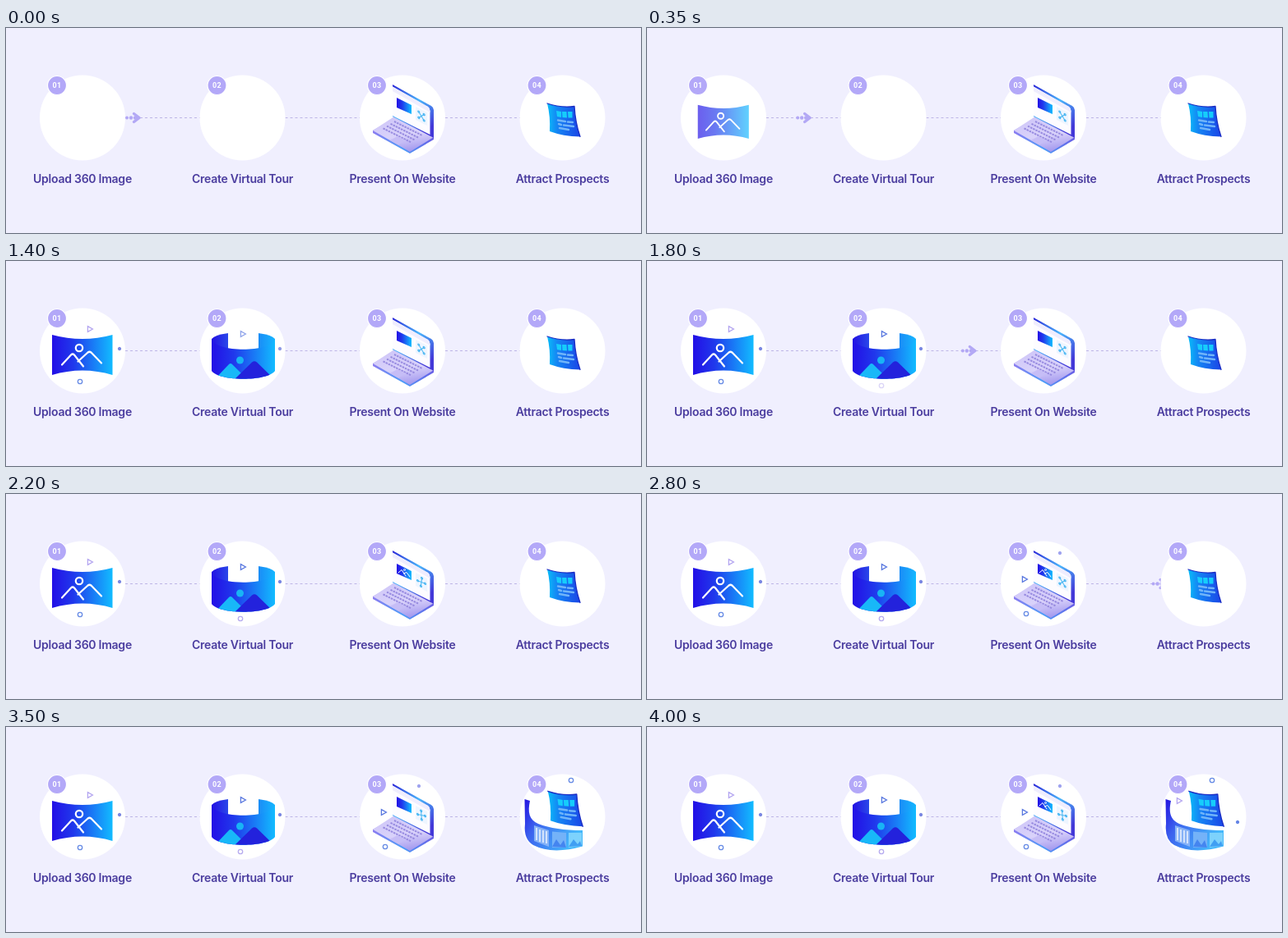
Animation, 772 px wide and 250 px high, one loop 4050 ms. Source, as an HTML page:

```html
<!DOCTYPE html>
<html lang="en">
<head>
<meta charset="utf-8">
<title>Four steps</title>
<style>
html, body { margin: 0; width: 100%; height: 100%; overflow: hidden; background: #f0effe; }
svg { display: block; }
.label { font: 600 14px Poppins, Inter, sans-serif; letter-spacing: -.25px; fill: #4b3d9f; text-anchor: middle; }
.num { font: 700 9px Roboto, sans-serif; letter-spacing: .3px; fill: #fff; text-anchor: middle; }
.line { fill: none; stroke-linecap: round; stroke-linejoin: round; }
</style>
</head>
<body>
<svg width="772" height="250" viewBox="0 0 772 250">
  <defs>
    <linearGradient id="blue"><stop stop-color="#230fe6"/><stop offset=".35" stop-color="#2038ec"/><stop offset="1" stop-color="#12bcff"/></linearGradient>
    <linearGradient id="back"><stop stop-color="#2410e2"/><stop offset="1" stop-color="#2a48ea"/></linearGradient>
    <linearGradient id="backRight"><stop stop-color="#1a8cf6"/><stop offset="1" stop-color="#16b6ff"/></linearGradient>
    <linearGradient id="sheet"><stop stop-color="#08bdf8"/><stop offset=".3" stop-color="#1585f4"/><stop offset="1" stop-color="#1a45e6"/></linearGradient>
    <linearGradient id="base" x1=".3" y1="0" x2=".6" y2="1"><stop stop-color="#cfc6f8"/><stop offset=".55" stop-color="#d9d2fa"/><stop offset="1" stop-color="#a297ee"/></linearGradient>
    <linearGradient id="rim"><stop stop-color="#8b7cf0"/><stop offset=".5" stop-color="#4c9cf8"/><stop offset="1" stop-color="#6a5ee6"/></linearGradient>
    <linearGradient id="frame" x2=".6" y2="1"><stop stop-color="#2a25d8"/><stop offset=".5" stop-color="#4ab4fa"/><stop offset="1" stop-color="#4338d8"/></linearGradient>
    <linearGradient id="strip" x2="1" y2=".5"><stop stop-color="#2414e0"/><stop offset=".35" stop-color="#3c62ee"/><stop offset="1" stop-color="#45b8fb"/></linearGradient>
    <clipPath id="band"><path d="M250 95C254 112 323 112 327 95V134C318 147 259 147 250 134Z"/></clipPath>
  </defs>

  <g id="lines" stroke="#bdb5e6" stroke-dasharray="3 3"></g>
  <g id="arrow" fill="#b3a8f5">
    <circle cx="1" cy="109.500" r="2"/><circle cx="6" cy="109.500" r="2.200"/><circle cx="11" cy="109.500" r="2.200"/>
    <path class="line" d="M9.500 104.500L16 109.500L9.500 114.500" stroke="#b3a8f5" stroke-width="3.400"/>
  </g>
  <g id="discs" fill="#fff"></g>

  <g id="photo">
    <path d="M56 90Q93 100 129.500 90V139Q93 128 56 139Z" fill="url(#blue)"/>
    <g class="line" stroke="#fff" stroke-width="2.200">
      <path d="M68 126.500L79 114.500Q81 112.500 83 114.500L94 128.500M87.500 122.500L99.500 111.500Q101.500 110 103.500 111.500L116 124.500"/>
      <circle cx="89" cy="106" r="4.200"/>
    </g>
  </g>

  <g id="tour">
    <path d="M250 95Q254 90 270 88V112L250 118Z" fill="url(#back)"/>
    <path d="M327 95Q323 90 307 88V112L327 118Z" fill="url(#backRight)"/>
    <path d="M250 95C254 112 323 112 327 95V134C318 147 259 147 250 134Z" fill="url(#blue)"/>
    <g clip-path="url(#band)">
      <path d="M252 146L271 126Q273 124 275 126L295 146Z" fill="#18b8f8"/>
      <path d="M276 146L299 123.500Q302 121 305 123.500L328 146Z" fill="#2322dc"/>
    </g>
    <circle cx="284.500" cy="121" r="4.500" fill="#18b4f5"/>
  </g>

  <g id="laptop">
    <path d="M446 125L472 110L520 133V136L491 153L446 128Z" fill="url(#rim)"/>
    <path d="M446 125L472 108L520 133L491 151Z" fill="url(#base)"/>
    <g id="keys" stroke="#978be0" stroke-width="2" stroke-dasharray="2.500 1"></g>
    <path d="M467 137L476 132L486 137L477 142.500Z" fill="#c6bdf6"/>
    <path d="M470 69L517 95Q520 97 520 100V134L470 108Z" fill="url(#frame)"/>
    <path d="M470 71.500L513 96Q515.500 98 515.500 101V130L470 107Z" fill="#fdfcff"/>
    <path d="M470 71.500L513 96Q515.500 98 515.500 101V103L470 77Z" fill="#efedfe"/>
    <path d="M475 85L493 94V105L475 97Z" fill="url(#blue)"/>
    <path d="M498 96L512 103V119L498 112Z" fill="#eef5ff"/>
    <g id="cross" class="line" stroke="#45b5f2" stroke-width="1.300">
      <path d="M-4 -5L4 5M4 -4L-4 4"/>
      <circle cx="-4" cy="-5" r="1.300"/><circle cx="4" cy="5" r="1.300"/><circle cx="4" cy="-4" r="1.300"/><circle cx="-4" cy="4" r="1.300"/>
    </g>
    <g id="thumb" class="line" stroke="#fff">
      <path d="M477 96L481 92.500L486 100M483.500 97L487 95.500L491 101"/><circle cx="484.500" cy="92.500" r="1"/>
    </g>
  </g>

  <g id="film">
    <path d="M630.500 88L637 90C634 104 636 113 647 118Q668 126 701 126V145.500Q664 156 641 144Q629 137 631 118Z" fill="url(#strip)"/>
    <path d="M642 120L660 126V146L642 139Z" fill="#86b2f7"/>
    <path d="M645 123V138M649 125V140M653 126V141M657 127V142" stroke="#fff" stroke-width="1.700" opacity=".75"/>
    <path d="M664 127.500L681 129V147L664 147Z" fill="#74b2f8"/>
    <path d="M664 146L669 137L674 144L678 138L681 147Z" fill="#4485f0"/>
    <path d="M684 129L700 129V145L684 147Z" fill="#7dd2fc"/>
    <path d="M684 146L690 137L695 143L698 139L700 145Z" fill="#3f9ff3"/>
  </g>
  <g id="panel">
    <path d="M658 92Q674 97.500 691 95.500Q692 115 698 132.500Q677 132 661 126Q662 108 658 92Z" fill="url(#sheet)"/>
    <path d="M658 92Q674 97.500 691 95.500Q692 115 698 132.500" class="line" stroke="#1a2cc4" stroke-width="1.300"/>
    <path d="M669 101L675 102V109L670 108ZM676 102H681.500L682 109.500L676.500 109ZM683 102H688.500V109.500H683.500Z" fill="#16cdfb"/>
    <path d="M671 112.500L680 114M683 114.500L689 115M672 117L675 118M678 118.500L690 120M673 122L684 124" class="line" stroke="#6fb4f9" stroke-width="2.400"/>
  </g>

  <g id="marks"></g>
  <g id="badges"></g>
</svg>
<script>
const LOOP = 4050, STEP = 50;
const $ = id => document.getElementById(id);
const add = (id, markup) => $(id).insertAdjacentHTML('beforeend', markup);
const clamp = v => Math.max(0, Math.min(1, v));
const ramp = (t, from, to) => clamp((t - from) / (to - from));
const ease = p => p * p * (3 - 2 * p);

['Upload 360 Image', 'Create Virtual Tour', 'Present On Website', 'Attract Prospects'].forEach((text, i) => {
  const x = 93 + i * 194.5;
  add('discs', `<circle cx="${x}" cy="109.500" r="52"/>`);
  add('badges', `<circle cx="${x - 31}" cy="70" r="11.500" fill="#b3a8f8" stroke="#fff" stroke-width="1.200"/>
    <text class="num" x="${x - 31}" y="73.200">0${i + 1}</text><text class="label" x="${x}" y="189">${text}</text>`);
  if (i < 3) add('lines', `<path d="M${x + 52} 109.500H${x + 143}"/>`);
});
for (let i = 0; i < 4; i++)
  add('keys', `<path d="M${472 - i * 4.5} ${114 + i * 2.8}l34 17"/>`);

// Floating marks: kind, x, y, colour, start of fade
const marks = [
  ['tri', 102, 83, '#b3a5f0', 450], ['ring', 90, 147, '#678be5', 500], ['dot', 138, 107, '#7b88e2', 550],
  ['tri', 288, 89, '#5877df', 1200], ['ring', 285, 152, '#b7acef', 1650], ['dot', 333, 107, '#7b88e2', 1150],
  ['tri', 459, 104, '#5877df', 2350], ['ring', 461, 146, '#678be5', 2450], ['dot', 502, 72, '#a0a4ef', 2400],
  ['tri', 647, 90, '#b3a5f0', 3600], ['ring', 687, 65, '#678be5', 3200], ['dot', 718, 116, '#6585e5', 3600]
];
const shapes = {
  tri: 'd="M-2.600 -3.400L3.400 0L-2.600 3.400Z"',
  ring: 'd="M-2.700 0a2.700 2.700 0 1 0 5.400 0a2.700 2.700 0 1 0 -5.400 0"',
  dot: 'd="M-1.500 0a1.500 1.500 0 1 0 3 0a1.500 1.500 0 1 0 -3 0"'
};
for (const [kind, x, y, color] of marks)
  add('marks', `<path ${shapes[kind]} transform="translate(${x} ${y})" stroke="${color}" stroke-width="1.300" fill="${kind === 'dot' ? color : 'none'}"/>`);

// Arrow trips: start and end time, tail position at each
const trips = [[0, 900, 146, 239], [1400, 2150, 321, 437], [2200, 2900, 516, 631]];

function grow(id, cx, cy, p) {
  const s = .4 + .6 * ease(p);
  $(id).setAttribute('transform', `translate(${cx} ${cy}) scale(${s}) translate(${-cx} ${-cy})`);
  $(id).setAttribute('opacity', p);
}

function draw(t) {
  const trip = trips.find(([from, to]) => t >= from && t < to);
  $('arrow').setAttribute('visibility', trip ? 'visible' : 'hidden');
  if (trip) {
    const [from, to, x0, x1] = trip;
    $('arrow').setAttribute('transform', `translate(${x0 + (x1 - x0) * ramp(t, from, to)})`);
  }

  grow('photo', 93, 114, ramp(t, 50, 500));
  grow('tour', 288, 116, ramp(t, 880, 1300));
  grow('film', 645, 122, ramp(t, 2900, 3350));

  const lift = ease(ramp(t, 2850, 3300));
  $('panel').setAttribute('transform',
    `translate(${678 + 2 * lift} ${112 - 12.5 * lift}) scale(${1 + .06 * lift}) translate(-678 -112)`);

  const fade = ramp(t, 1850, 2100) * (1 - ramp(t, 3000, 3300)) + ramp(t, 3650, 3900);
  $('thumb').setAttribute('opacity', fade);
  const turn = 45 * ease(ramp(t, 1900, 2200)) * (1 - ease(ramp(t, 2300, 2700))) + 35 * ease(ramp(t, 3050, 3450));
  $('cross').setAttribute('transform', `translate(505 107.500) matrix(.8 .32 0 .8 0 0) rotate(${turn})`);

  marks.forEach((mark, i) => $('marks').children[i].setAttribute('opacity', ramp(t, mark[4], mark[4] + 300)));
}

const start = performance.now();
function tick() {
  const t = (performance.now() - start) % LOOP;
  draw(Math.floor(t / STEP) * STEP);
  requestAnimationFrame(tick);
}
draw(0);
requestAnimationFrame(tick);
</script>
</body>
</html>
```
